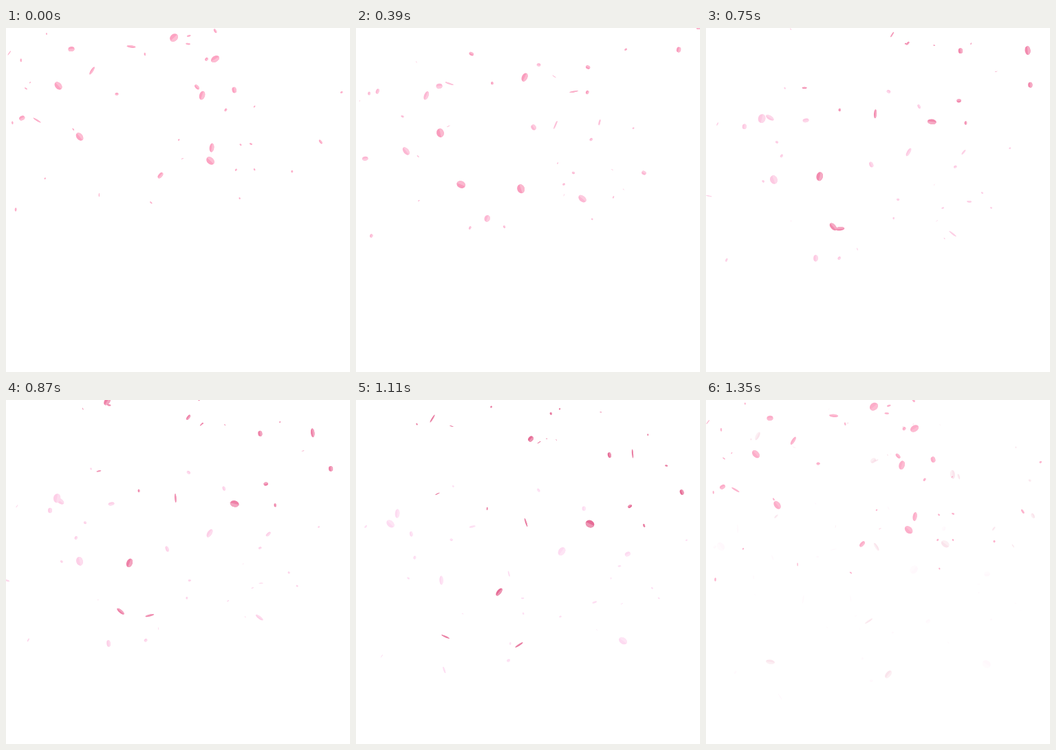
Animation of 500 by 500 pixels, one loop 1.38 s. Source, as an HTML page with a canvas:

```html
<!DOCTYPE html>
<html>
<head>
<meta charset="utf-8">
<style>
html, body { margin: 0; width: 100%; height: 100%; overflow: hidden; background: #fff; }
canvas { display: block; width: 500px; height: 500px; }
</style>
</head>
<body>
<canvas id="stage" width="500" height="500"></canvas>
<script>
const SIZE = 500, LOOP = 1380, STEP = 30, SPAN = 1110;
const ctx = document.getElementById('stage').getContext('2d');

const WHITE = [255, 255, 255];
const PINK = [252, 163, 194], ROSE = [230, 108, 150], BLUSH = [253, 219, 241];

const mix = (a, b, k) => a + (b - a) * k;
const blend = (from, to, k) => from.map((v, i) => mix(v, to[i], k));
const css = color => `rgb(${color.map(Math.round).join(',')})`;

function seeded(seed) {
  return () => (seed = (seed * 16807) % 2147483647) / 2147483647;
}
const random = seeded(4217);
const between = (low, high) => mix(low, high, random());

// A petal drifts by dx, dy every SPAN ms while it turns and flips over.
function makePetal(x, y, dx, dy, length, tone) {
  return {
    x, y, dx, dy, length, tone,
    angle: between(0, Math.PI), turn: between(-0.0015, 0.0015),
    flip: between(0, Math.PI), flipRate: between(0.001, 0.003)
  };
}

// The large petals nearest to the viewer.
const fading = [
  [182, 27, -132, 153], [125, 62, -65, 103], [285, 98, 14, 122],
  [45, 134, 79, 128], [297, 193, 91, 157]
];
const deepening = [
  [299, 174, -169, 170], [107, 158, 130, 198], [76, 84, 132, 195], [244, 14, 3, 164],
  [304, 45, 36, 135], [278, -90, -167, 117], [604, -62, -202, 140]
];
const petals = [
  ...fading.map(path => makePetal(...path, 13, BLUSH)),
  ...deepening.map(path => makePetal(...path, 13, ROSE))
];

// Smaller petals: the sky is fullest at the upper left, and others follow from above.
for (let i = 0; i < 52; i++) {
  const near = random() ** 1.6;
  const entering = i % 3 === 0;
  const x = SIZE * (entering ? between(0.3, 1) : random() ** 1.4);
  const y = entering ? between(-130, 0) : 290 * random() ** 1.3;
  petals.push(makePetal(
    x, y, between(-130, 130), mix(90, 160, near) + between(-15, 25),
    mix(2.5, 10, near), entering || i % 3 === 1 && y < 80 ? ROSE : BLUSH
  ));
}

function drawPetal(p, t, alpha) {
  const k = t / SPAN, aged = Math.min(1, Math.max(0, k));
  const rx = p.length / 2;
  const ry = rx * Math.max(0.16, 0.82 * Math.abs(Math.cos(p.flip + p.flipRate * t)));
  const color = blend(PINK, p.tone, p.tone === ROSE ? aged ** 2 : aged);
  ctx.save();
  ctx.globalAlpha = alpha;
  ctx.translate(p.x + p.dx * k, p.y + p.dy * k);
  ctx.rotate(p.angle + p.turn * t);
  ctx.fillStyle = css(color);
  ctx.beginPath();
  ctx.ellipse(0, 0, rx, ry, 0, 0, Math.PI * 2);
  ctx.fill();
  // Lighter half above the fold.
  ctx.fillStyle = css(blend(color, WHITE, 0.28));
  ctx.beginPath();
  ctx.ellipse(0, 0, rx, ry, 0, Math.PI, Math.PI * 2);
  ctx.fill();
  ctx.restore();
}

// The end of the loop dissolves into the flight that leads up to its start.
function draw(t) {
  ctx.fillStyle = css(WHITE);
  ctx.fillRect(0, 0, SIZE, SIZE);
  const fade = Math.max(0, (t - SPAN) / (LOOP - SPAN));
  for (const p of petals) drawPetal(p, t, 1 - fade);
  if (fade > 0) for (const p of petals) drawPetal(p, t - LOOP, fade);
}

const start = performance.now();
function tick() {
  const t = (performance.now() - start) % LOOP;
  draw(Math.floor(t / STEP) * STEP);
  requestAnimationFrame(tick);
}
tick();
</script>
</body>
</html>
```
